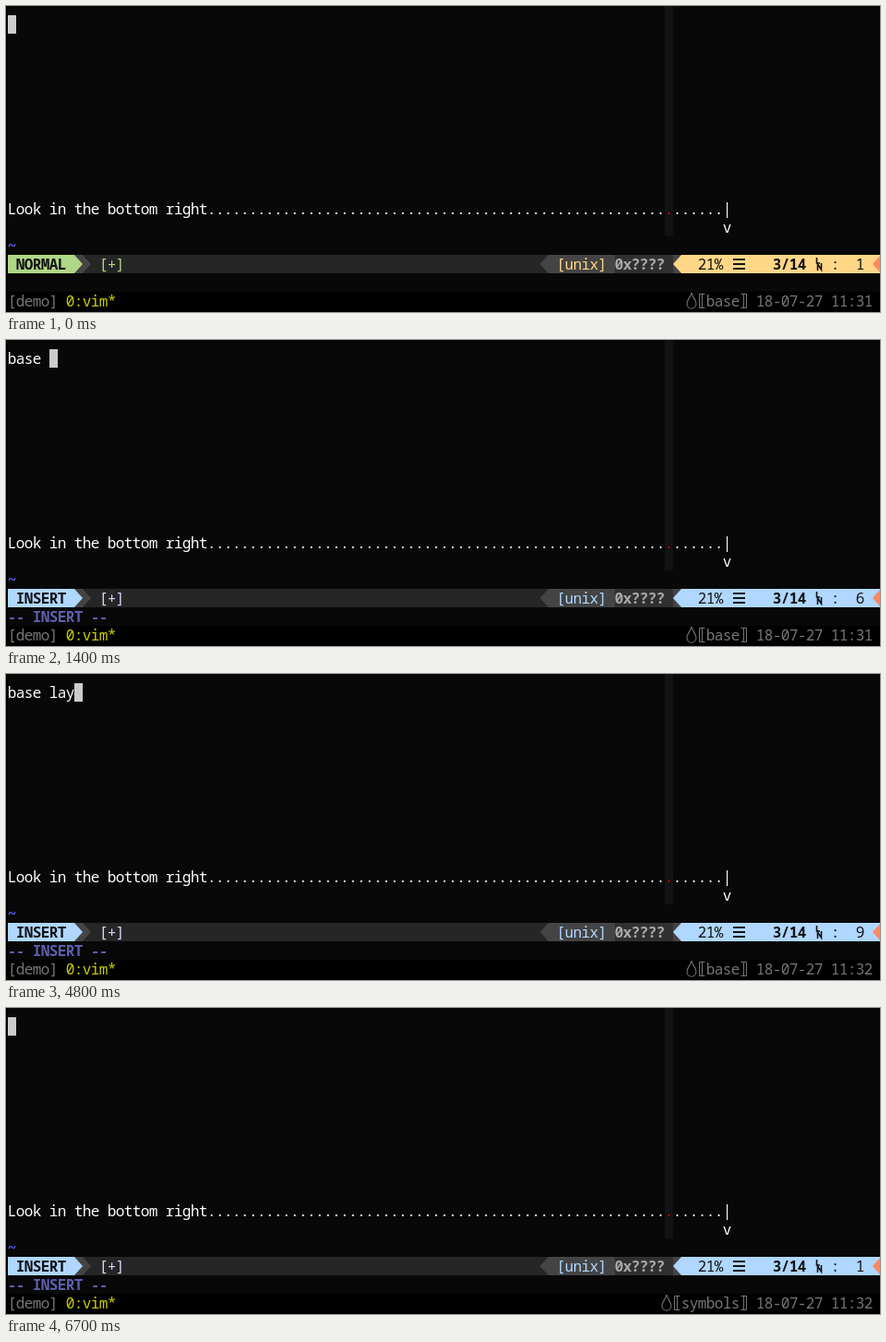
An HTML page with a canvas that plays this animation: 946x332 px, repeating every 8 s.

```html
<!DOCTYPE html>
<html lang="en">
<head>
<meta charset="utf-8">
<title>Terminal editor demo</title>
<style>
html, body { margin: 0; width: 100%; height: 100%; overflow: hidden; background: #000; }
canvas { display: block; }
</style>
</head>
<body>
<canvas id="stage" width="946" height="332"></canvas>
<script>
const ctx = document.getElementById("stage").getContext("2d");
const LOOP = 8000, CELL = 9, ROW = 20;
const FONT = '16px "Noto Sans Mono", "DejaVu Sans Mono", monospace';
const LINE = "base layer";
const WHITE = "#ffffff";
const RULER = 79;
const INSERT_AT = 400, MINUTE_AT = 3700, SYMBOLS_AT = 6700;

// [time, characters on the first line]
const KEYS = [
  [0, 0], [900, 1], [1200, 2], [1300, 4], [1400, 5],
  [1600, 6], [1700, 7], [1800, 8], [1900, 9], [2000, 10],
  [4600, 9], [4800, 8], [4900, 7], [5100, 6], [5200, 5],
  [5400, 4], [5500, 3], [5700, 2], [5900, 1], [6100, 0]
];

const colX = col => 2 + col * CELL;
const rowY = row => 10 + row * ROW;

function text(str, col, row, color, bold) {
  ctx.font = (bold ? "bold " : "") + FONT;
  ctx.textAlign = "center";
  ctx.fillStyle = color;
  [...str].forEach((ch, i) => {
    if (ch !== " ") ctx.fillText(ch, colX(col + i) + CELL / 2, rowY(row) + 16);
  });
}

function cells(col, row, count, color) {
  ctx.fillStyle = color;
  ctx.fillRect(colX(col), rowY(row), count * CELL, ROW);
}

function arrow(col, row, dir, color, back) {
  cells(col, row, 1, back);
  const tip = colX(dir > 0 ? col + 1 : col);
  const base = tip - dir * CELL;
  const y = rowY(row);
  ctx.fillStyle = color;
  ctx.beginPath();
  ctx.moveTo(base, y);
  ctx.lineTo(tip, y + ROW / 2);
  ctx.lineTo(base, y + ROW);
  ctx.fill();
}

function stroke(points, color, width) {
  ctx.strokeStyle = color;
  ctx.lineWidth = width;
  ctx.beginPath();
  points.forEach(([x, y]) => ctx.lineTo(x, y));
  ctx.stroke();
}

function bracket(col, dir, color) {
  const x = colX(col) + (dir > 0 ? 1.5 : 7.5);
  const top = 312.5, bottom = 327.5;
  stroke([[x + dir * 6, top], [x, top], [x, bottom], [x + dir * 6, bottom]], color, 1);
  stroke([[x + dir * 3, top], [x + dir * 3, bottom]], color, 1);
}

function drop(col, color) {
  const x = colX(col) + 2;
  ctx.strokeStyle = color;
  ctx.lineWidth = 1.1;
  ctx.beginPath();
  ctx.moveTo(x, 311);
  ctx.bezierCurveTo(x + 1, 316, x + 5, 319, x + 5, 323);
  ctx.bezierCurveTo(x + 5, 330, x - 5, 330, x - 5, 323);
  ctx.bezierCurveTo(x - 5, 319, x - 1, 316, x, 311);
  ctx.stroke();
}

function drawBuffer(count) {
  ctx.fillStyle = "#080808";
  ctx.fillRect(2, 0, 944, 310);
  ctx.fillStyle = "#121212";
  ctx.fillRect(colX(RULER), 0, CELL, 250);

  text(LINE.slice(0, count), 0, 0, WHITE);
  cells(count, 0, 1, "#cccccc");
  text("Look in the bottom right" + ".".repeat(55), 0, 10, WHITE);
  text(".", RULER, 10, "#cd0000");
  text("......|", RULER + 1, 10, WHITE);
  text("v", 86, 11, WHITE);
  text("~", 0, 12, "#5f5fff", true);
}

function drawStatus(count, insert) {
  const row = 13, ink = "#121212", mid = "#262626", side = "#444444";
  const mode = insert ? "#afd7ff" : "#afd787";
  const tail = insert ? "#afd7ff" : "#ffd787";

  cells(0, row, 105, mid);
  cells(0, row, 8, mode);
  text(insert ? "INSERT" : "NORMAL", 1, row, ink, true);
  arrow(8, row, 1, mode, side);
  arrow(9, row, 1, side, mid);
  text("[+]", 11, row, insert ? "#d7d7ff" : mode);

  arrow(64, row, -1, side, mid);
  cells(65, row, 8, side);
  cells(73, row, 7, "#303030");
  text("[unix]", 66, row, tail);
  text("0x????", 73, row, "#a8a8a8", true);

  arrow(80, row, -1, tail, side);
  cells(81, row, 23, tail);
  text("21%", 83, row, ink);
  for (const y of [275, 280, 285]) stroke([[787, y], [800, y]], ink, 2);
  text("3/14", 92, row, ink, true);
  stroke([[877.5, 273], [877.5, 279], [881, 279]], ink, 1.6);
  stroke([[878.5, 287], [878.5, 280], [882.5, 286], [882.5, 279]], ink, 1.6);
  text(":", 99, row, ink);
  text(String(count + 1).padStart(2), 101, row, ink);
  arrow(104, row, -1, "#ff875f", tail);

  if (insert) text("-- INSERT --", 0, 14, "#5f5faf", true);
}

function drawBar(minute, layer) {
  const row = 15, gray = "#767676";
  const start = 88 - layer.length;
  text("[demo]", 0, row, gray);
  text("0:vim*", 7, row, "#cdcd00");
  drop(start - 2, gray);
  bracket(start - 1, 1, gray);
  text(layer, start, row, gray);
  bracket(88, -1, gray);
  text("18-07-27 11:" + minute, 90, row, gray);
}

function render(now) {
  const t = now % LOOP;
  const count = KEYS.filter(([at]) => at <= t).pop()[1];
  ctx.fillStyle = "#000";
  ctx.fillRect(0, 0, 946, 332);
  drawBuffer(count);
  drawStatus(count, t >= INSERT_AT);
  drawBar(t < MINUTE_AT ? 31 : 32, t < SYMBOLS_AT ? "base" : "symbols");
}

const began = performance.now();
function tick() {
  render(performance.now() - began);
  requestAnimationFrame(tick);
}
tick();
</script>
</body>
</html>
```
